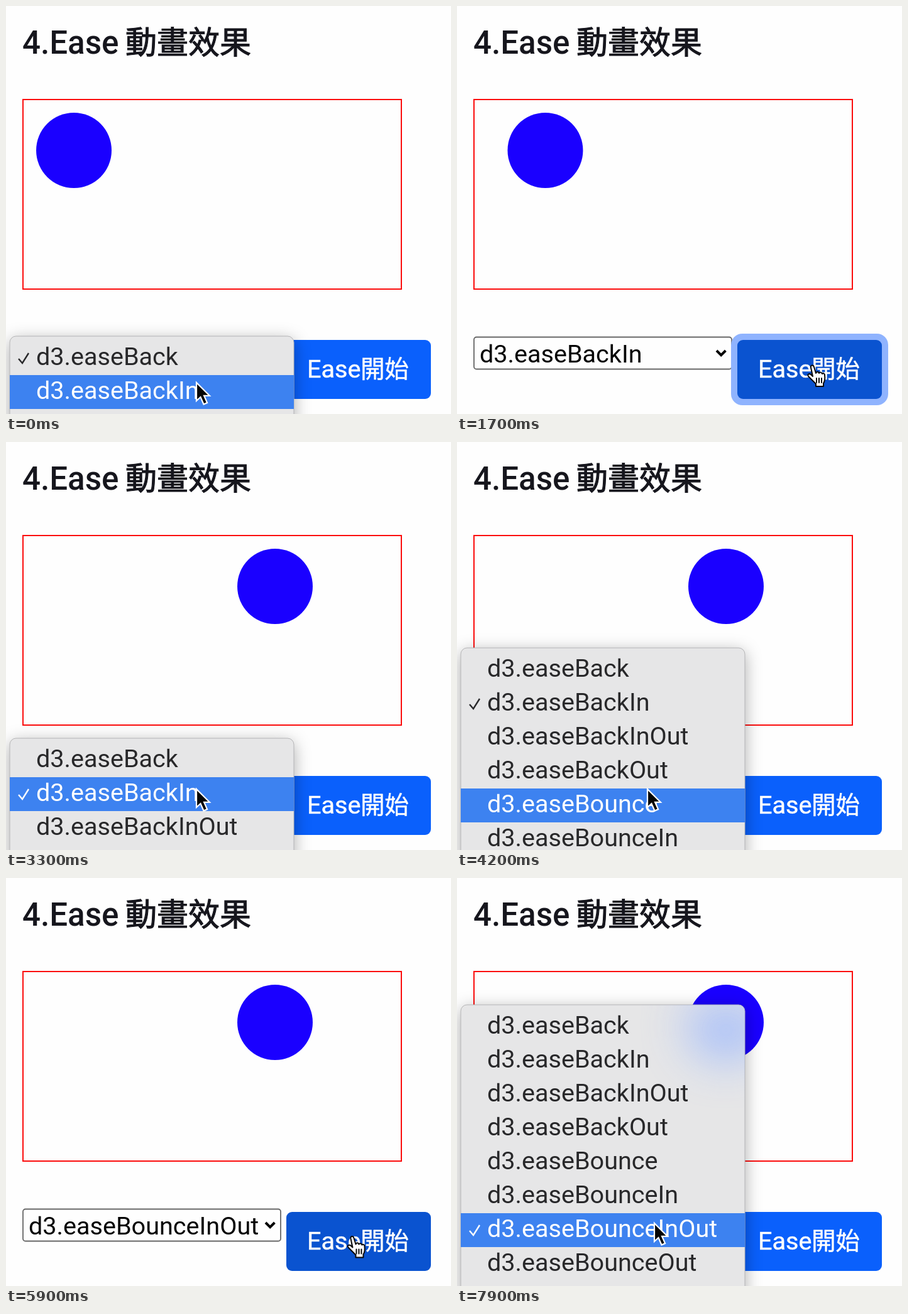
These frames come from a looping animation (708x650 px, 8 s). An HTML page:

```html
<!DOCTYPE html>
<html lang="zh-Hant">
<head>
<meta charset="utf-8">
<title>Ease</title>
<style>
  html, body { margin: 0; width: 100%; height: 100%; overflow: hidden; background: #fefefe; }
  svg { display: block; width: 708px; height: 650px; }
  text { font: 39.6px Roboto, "Noto Sans CJK TC", "Noto Sans CJK", sans-serif; white-space: pre; }
  .title { font-weight: 500; fill: #16161d; }
  .cjk { font-size: 50px; stroke: #16161d; stroke-width: 1.1px; }
  .label { fill: #fefefe; stroke: #fefefe; stroke-width: .5px; }
  .shadow { filter: drop-shadow(0 6px 13px rgba(0, 0, 0, .32)); }
  #glow { filter: blur(38px); }
</style>
</head>
<body>
<svg viewBox="0 0 708 650">
  <defs>
    <clipPath id="plot"><rect x="28" y="150" width="600" height="300"/></clipPath>
    <clipPath id="panelClip"><rect id="panelShape" x="6" width="452" height="700" rx="10"/></clipPath>
    <clipPath id="belowTop"><rect id="belowShape" width="708" height="700"/></clipPath>
  </defs>

  <text class="title" x="26" y="76" style="font-size:51px">4.Ease</text>
  <text class="title cjk" x="190" y="76">動畫效果</text>

  <rect x="27" y="149" width="602" height="302" fill="none" stroke="#fb0d0d" stroke-width="2"/>
  <g clip-path="url(#plot)"><circle id="ball" cy="230" r="60" fill="#1a00ff"/></g>

  <rect x="27" y="527.5" width="410" height="51" rx="4" fill="#fefefe" stroke="#666" stroke-width="1.8"/>
  <text id="value" x="36" y="568" fill="#050505"></text>
  <path d="M413 549l7.2 7.2 7.2-7.2" fill="none" stroke="#050505" stroke-width="4"/>

  <rect id="focus" x="436" y="522" width="250" height="114" rx="18" fill="#8fb3fe"/>
  <rect id="button" x="446" y="532" width="230" height="94" rx="9"/>
  <text class="label" x="479" y="592">Ease</text>
  <text class="label" x="564" y="592" style="font-size:38.5px">開始</text>

  <g id="menu">
    <g id="panel">
      <rect class="shadow" x="6" width="452" height="700" rx="10" fill="#e6e6e7" stroke="#b4b4b6"/>
    </g>
    <!-- the ball shining through the translucent panel -->
    <g clip-path="url(#panelClip)">
      <g id="glow" opacity=".85">
        <g clip-path="url(#belowTop)"><circle id="ghost" cy="230" r="60" fill="#96b4ff"/></g>
      </g>
    </g>
    <g id="list">
      <rect id="hover" x="6" width="452" height="54" fill="#3d82f0"/>
      <path id="check" fill="none" stroke-width="2.4"/>
    </g>
  </g>

  <circle id="press" r="43" fill="none" stroke="#0a0a0a" stroke-width="2.6"/>
  <path id="arrow" d="M0 0V29l6.5-6 5 11.5 5.6-2.4-5-11.3h8.8z" fill="#050505" stroke="#fefefe" stroke-width="2.2"/>
  <g id="hand" stroke="#0a0a0a" stroke-width="2" stroke-linejoin="round" stroke-linecap="round">
    <path d="M0 3c-1-4 4-5 5-1l3 10c1-3 4-3 5 0 1-2 4-2 5 1 2-2 4 0 4 2 1 7 0 10-2 13v5H8v-4c-4-4-8-8-12-12-2-3 1-5 4-3l3 3z" fill="#fefefe"/>
    <path d="M9 20v7M13 20v7M17 20v7" fill="none"/>
  </g>
</svg>

<script>
const $ = id => document.getElementById(id);
const set = (el, attrs) => { for (const k in attrs) el.setAttribute(k, attrs[k]); };
const show = (el, on) => set(el, { visibility: on ? 'visible' : 'hidden' });
const within = (t, a, b) => t >= a && t < b;

const LOOP = 8000, ROW = 54, PAD = 8;
const names = ['Back', 'BackIn', 'BackInOut', 'BackOut', 'Bounce', 'BounceIn',
  'BounceInOut', 'BounceOut', 'Circle'].map(n => 'd3.ease' + n);

const items = names.map((name, i) => {
  const el = document.createElementNS('http://www.w3.org/2000/svg', 'text');
  set(el, { x: 48, y: PAD + ROW * i + 38 });
  el.textContent = name;
  $('list').append(el);
  return el;
});

// Interpolates keys [time, ...values] with a smooth start and stop.
function track(t, keys) {
  const n = keys.findIndex(k => k[0] > t);
  if (n < 0) return keys.at(-1).slice(1);
  if (n === 0) return keys[0].slice(1);
  const a = keys[n - 1], b = keys[n];
  const u = (t - a[0]) / (b[0] - a[0]), s = u * u * (3 - 2 * u);
  return a.slice(1).map((v, i) => v + (b[i + 1] - v) * s);
}

const pointer = [
  [0, 303, 600], [600, 303, 600], [1060, 563, 573], [2250, 563, 573],
  [2800, 303, 553], [4750, 303, 553], [5150, 293, 603], [5560, 293, 603],
  [5930, 553, 571], [6950, 553, 571], [7350, 314, 550]
];
const menuTop = [
  [0, 526], [1500, 526], [1501, 472], [3500, 472], [4100, 328],
  [4350, 328], [4750, 256], [6500, 256], [6501, 202]
];
const menuAlpha = [
  [0, 1], [450, 1], [650, 0], [2999, 0], [3000, 1], [5550, 1], [5750, 0], [7499, 0], [7500, 1]
];
const presses = [[250, 400], [1080, 1180], [2900, 3000], [5350, 5500], [5950, 6050], [7400, 7500]];

const backIn = t => t * t * (2.70158 * t - 1.70158);
function bounceOut(t) {
  const k = 7.5625;
  if (t < 4 / 11) return k * t * t;
  if (t < 8 / 11) return k * (t - 6 / 11) ** 2 + .75;
  if (t < 10 / 11) return k * (t - 9 / 11) ** 2 + .9375;
  return k * (t - 21 / 22) ** 2 + .984375;
}
const bounceInOut = t => t < .5 ? (1 - bounceOut(1 - 2 * t)) / 2 : (bounceOut(2 * t - 1) + 1) / 2;

const DURATION = 750;
const runs = [[1172, backIn], [6050, bounceInOut]];

function ballX(t) {
  const run = runs.findLast(r => t >= r[0]);
  return 108 + (run ? 320 * run[1](Math.min(1, (t - run[0]) / DURATION)) : 0);
}

function draw(t) {
  const [x, y] = track(t, pointer);
  const [top] = track(t, menuTop);
  const [alpha] = track(t, menuAlpha);
  const chosen = t < 400 ? 0 : t < 5500 ? 1 : 6;
  const open = alpha > 0;

  const cx = ballX(t);
  set($('ball'), { cx });
  set($('ghost'), { cx });
  $('value').textContent = names[chosen];

  const focused = within(t, 1080, 2950) || within(t, 5950, 7450);
  const over = !open && x > 446;
  show($('focus'), focused);
  set($('button'), { fill: focused || over ? '#0a53d0' : '#0a60fc' });

  set($('menu'), { opacity: alpha });
  show($('menu'), open);
  if (open) {
    const at = `translate(0 ${top})`;
    set($('panel'), { transform: at });
    set($('list'), { transform: at });
    set($('panelShape'), { y: top });
    set($('belowShape'), { y: top });
    const row = Math.floor((y - top - PAD) / ROW);
    const ink = i => i === row ? '#fefefe' : '#28282a';
    set($('hover'), { y: PAD + ROW * row });
    items.forEach((el, i) => set(el, { fill: ink(i) }));
    set($('check'), { d: `M20 ${PAD + ROW * chosen + 28}l6 7 10-16`, stroke: ink(chosen) });
  }

  set($('press'), { cx: x, cy: y + 2 });
  show($('press'), presses.some(([a, b]) => within(t, a, b)));
  const place = { transform: `translate(${x} ${y})` };
  set($('arrow'), place);
  set($('hand'), place);
  show($('arrow'), !over);
  show($('hand'), over);
}

function tick() {
  draw(performance.now() % LOOP);
  requestAnimationFrame(tick);
}
tick();
</script>
</body>
</html>
```
